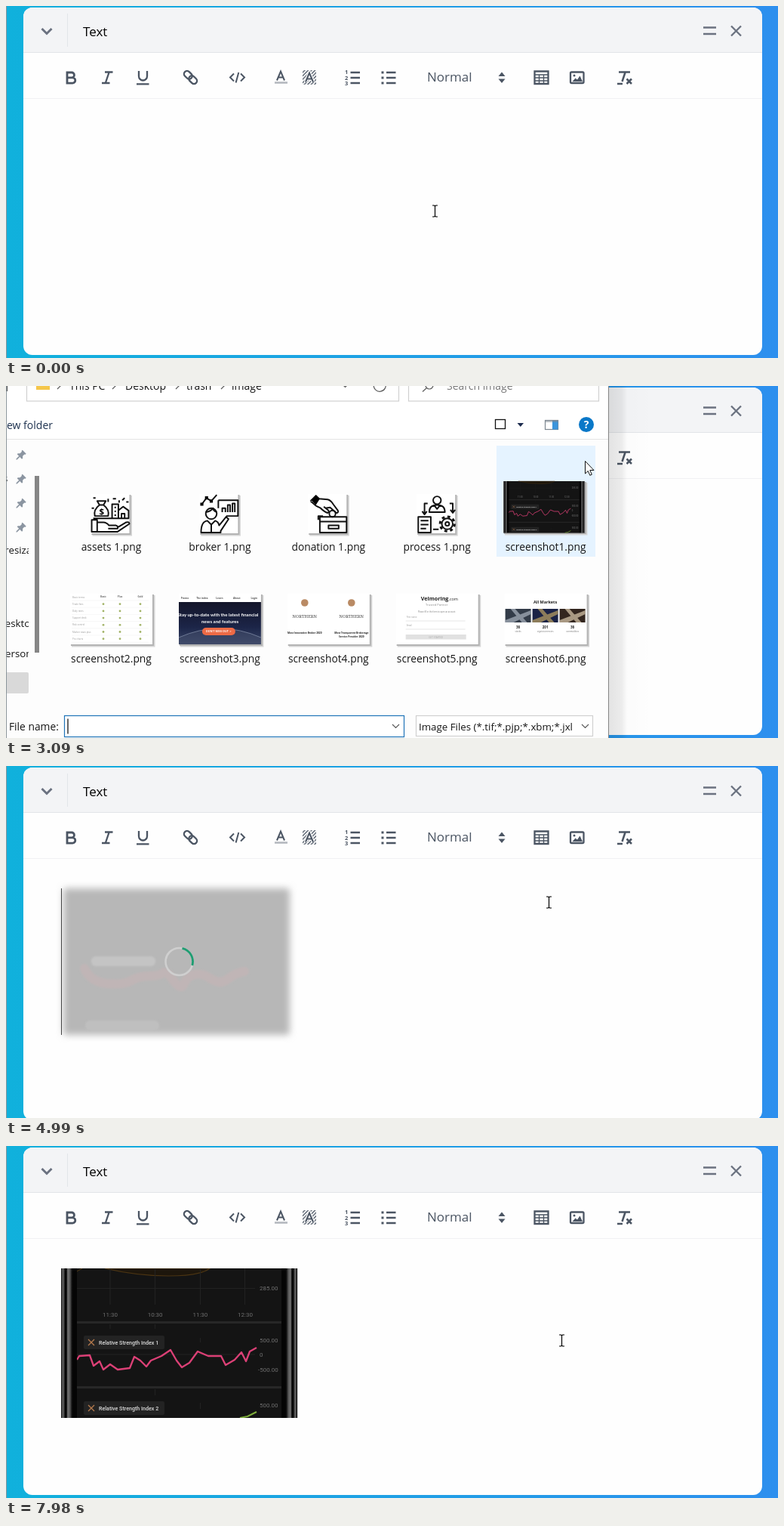
Recreate the animation shown at these times as an HTML page. Size 1023x466 px, loop 8000 ms.

```html
<!DOCTYPE html>
<html lang="en">
<head>
<meta charset="utf-8">
<title>Image upload in a text editor</title>
<style>
html, body { margin: 0; width: 100%; height: 100%; overflow: hidden; background: #1f9fe5; }
svg { display: block; width: 1023px; height: 466px; font-family: "Open Sans", "Noto Sans", sans-serif; }
text { white-space: pre; }
.line { fill: none; stroke: #4b5563; stroke-width: 2.3; }
.ink { fill: #4b5563; }
.head { fill: none; stroke: #6b7280; stroke-width: 2.3; }
.file { font-size: 13.8px; fill: #151515; }
.small { font-size: 13.3px; fill: #151515; }
.thin { fill: none; stroke: #5c5c5c; stroke-width: 1.2; }
.art { fill: none; stroke: #111; stroke-width: 1.9; stroke-linejoin: round; }
.mono { font-family: Roboto, sans-serif; font-size: 8px; fill: #707070; }
.badge { font-family: Roboto, sans-serif; font-size: 7.1px; font-weight: 500; fill: #ddd; }
</style>
</head>
<body>
<svg viewBox="0 0 1023 466" xmlns="http://www.w3.org/2000/svg">
<defs>
  <linearGradient id="sky"><stop stop-color="#10b1dc"/><stop offset="1" stop-color="#2d8fee"/></linearGradient>
  <linearGradient id="shade"><stop stop-color="#000" stop-opacity=".11"/><stop offset=".3" stop-color="#000" stop-opacity=".07"/><stop offset=".42" stop-color="#000" stop-opacity=".01"/><stop offset="1" stop-color="#000" stop-opacity="0"/></linearGradient>
  <linearGradient id="metal">
    <stop stop-color="#000"/><stop offset=".08" stop-color="#5c5c5c"/><stop offset=".18" stop-color="#505050"/>
    <stop offset=".24" stop-color="#060606"/><stop offset=".34" stop-color="#060606"/><stop offset=".42" stop-color="#757575"/>
    <stop offset=".56" stop-color="#585858"/><stop offset=".68" stop-color="#111"/><stop offset=".75" stop-color="#050505"/>
  </linearGradient>
  <linearGradient id="space" x2="0" y2="1"><stop stop-color="#14162a"/><stop offset=".6" stop-color="#1c2548"/><stop offset="1" stop-color="#3a4668"/></linearGradient>
  <pattern id="hatch" width="3.2" height="3.2" patternUnits="userSpaceOnUse" patternTransform="rotate(45)"><path d="M1 0V3.2" stroke="#4b5563" stroke-width="1.3"/></pattern>
  <filter id="soft" x="-10%" y="-15%" width="120%" height="130%"><feGaussianBlur stdDeviation="5"/></filter>
  <filter id="smudge" x="-10%" y="-60%" width="120%" height="220%"><feGaussianBlur stdDeviation="1"/></filter>
  <clipPath id="side"><path d="M-40 60H30V430H-40z"/></clipPath>
  <clipPath id="kinds"><path d="M545 430H754V470H545z"/></clipPath>
  <clipPath id="thumb"><path d="M0 0H109V67H0z"/></clipPath>
  <clipPath id="loaded"><rect id="reveal" width="313" height="198"/></clipPath>
</defs>

<rect width="1023" height="466" fill="url(#sky)"/>
<rect id="panel" x="23" y="2" width="979" height="460" rx="12" fill="#fefefe"/>
<path d="M23 62V14a12 12 0 0 1 12-12H990a12 12 0 0 1 12 12V62z" fill="#f3f4f6"/>
<path d="M23 61.5H1002M81.5 10V54" stroke="#e2e5e9"/>
<path d="M23 122.5H1002" stroke="#f1f1f3"/>
<path d="M47.5 30l6.5 6.5 6.5-6.5" fill="none" stroke="#6b7280" stroke-width="3"/>
<text x="102" y="40" font-size="17" font-weight="500">Text</text>
<path class="head" d="M924 28.5H941M924 37H941M961 26.5l13 13M974 26.5l-13 13"/>

<rect id="hover" x="734" y="72" width="45" height="45" rx="10" fill="#f3f4f6"/>
<g class="line">
  <path stroke-width="2.8" d="M81 88h6a3.4 3.4 0 0 1 0 6.9H81zM81 94.9h7.2a3.6 3.6 0 0 1 0 7.2H81z"/>
  <path d="M131 87.5H141.5M127 102H137.5M136.5 88L131.8 102"/>
  <path d="M176 86v7a5.5 5.5 0 0 0 11 0V86M173 103.3H189.5"/>
  <g transform="translate(244.5 94.5) rotate(45)"><rect x="-10.5" y="-4" width="12" height="8" rx="4"/><rect x="-1.5" y="-4" width="12" height="8" rx="4"/></g>
  <path d="M302 89.5l-5 5 5 5M311 89.5l5 5-5 5M308.3 88L304.6 101.5" stroke-width="2"/>
  <path d="M359 98.5l5-12 5 12M361 94.5h6.5" stroke-width="2"/>
  <path d="M356 101.5H373" stroke="#b4b8bf" stroke-width="2.6"/>
  <path d="M393 85H411V104H393z" fill="url(#hatch)" stroke="none"/>
  <path d="M397 100.5l5-12 5 12M399 96.5h6.5" stroke="#fefefe" stroke-width="4.5"/>
  <path d="M397 100.5l5-12 5 12M399 96.5h6.5" stroke-width="2"/>
  <path d="M456.5 88H469M456.5 95H469M456.5 102H469M504 88H516.5M504 95H516.5M504 102H516.5" stroke-width="2.4"/>
  <path d="M497.5 88h3M497.5 95h3M497.5 102h3" stroke-width="3"/>
  <path d="M700.5 91H719M706.5 91V103M712.5 91V103M701 95H719M701 99H719" stroke-width="1.4"/>
  <path d="M700.5 86.5H718.5V103H700.5z"/>
  <rect x="748" y="87.5" width="17.5" height="14.5" rx="1.5"/>
  <path d="M812 87.5H827M820.5 88L816.5 100M810 103H817M822.5 96.5l6.5 6.5M829 96.5l-6.5 6.5" stroke-width="2.5"/>
</g>
<g class="ink">
  <path d="M750.5 100l4-4.5 2.5 2 3.5-5 3.5 7.5zM652.5 93l4.5-5.5 4.5 5.5zM652.5 96.5l4.5 5.5 4.5-5.5z"/>
  <circle cx="753" cy="92" r="1.5"/>
  <g font-size="7.5" font-weight="700"><text x="449" y="90">1</text><text x="449" y="97.5">2</text><text x="449" y="105">3</text></g>
  <text x="558" y="100" font-size="17">Normal</text>
</g>

<g id="busy">
  <rect x="76" y="162" width="300" height="194" rx="4" fill="#b7b7b7" filter="url(#soft)"/>
  <g filter="url(#smudge)">
    <path d="M104 268q8 18 30 20t32-4 24-6 18-4 14 10 14 4 14-12 22 6 22 0 22-10" fill="none" stroke="#c0b5b6" stroke-width="12" stroke-linejoin="round" stroke-linecap="round"/>
    <rect x="113" y="252" width="85" height="13" rx="6" fill="#c4c4c4"/>
    <rect x="105" y="337" width="98" height="13" rx="6" fill="#bfbfbf"/>
  </g>
  <circle cx="229.5" cy="259" r="18" fill="none" stroke="#cfcfcf" stroke-width="2.6"/>
  <path id="arc" d="M233.5 241.4A18 18 0 0 1 246.8 264" fill="none" stroke="#1f9d72" stroke-width="2.8"/>
  <path d="M73.5 162V356" stroke="#444"/>
</g>
<g id="photo" transform="translate(73 162)"><g id="chart" clip-path="url(#loaded)"></g></g>
<path id="caret" d="M385.5 162V360" stroke="#000" stroke-width="1.2"/>

<g id="dialog"></g>
<g id="tip">
  <rect x="734" y="178" width="160" height="65" fill="#000" opacity=".22"/>
  <rect x="731.5" y="175.5" width="160" height="65" rx="2" fill="#fdfdfd" stroke="#b5b5b5"/>
  <g font-size="13.8" fill="#575757"><text x="737" y="193">Item type: PNG File</text><text x="737" y="213">Dimensions: 250 x 158</text><text x="737" y="233">Size: 19.8 KB</text></g>
</g>
<path d="M.5 0V466" stroke="#8d979c"/>
<path id="beam" d="M-3.5-7.5h2.5l1 1 1-1h2.5M0-6.5V6.5M-3.5 7.5h2.5l1-1 1 1h2.5" fill="none" stroke="#000" stroke-width="1.2"/>
<path id="arrow" d="M0 0V16.5L3.8 13 6.3 18.8 8.8 17.7 6.3 12H11.5z" fill="#fff" stroke="#111"/>
<path id="hand" d="M-2 14.5L-6.8 9.8q-1.2-2 .6-2.5 1-.2 2 .8L-1.7 10.2V1q0-1.6 1.6-1.6T1.5 1V7q.4-1.2 1.7-1 1.5.2 1.5 1.4.5-.8 1.6-.6 1.4.2 1.4 1.6.4-.5 1.2-.4 1.4.2 1.4 1.8V15q0 2-1.5 4V22H-.5V19z" fill="#fff" stroke="#111" stroke-width="1.2" stroke-linejoin="round"/>
</svg>

<script>
const $ = id => document.getElementById(id);
const text = (x, y, s, attr = '') => `<text x="${x}" y="${y}" ${attr}>${s}</text>`;
const path = (d, attr = '') => `<path d="${d}" ${attr}/>`;
const rect = (x, y, w, h, fill, attr = '') => `<rect x="${x}" y="${y}" width="${w}" height="${h}" fill="${fill}" ${attr}/>`;
const dot = (x, y, r, attr) => `<circle cx="${x}" cy="${y}" r="${r}" ${attr}/>`;
const at = (x, y, s, extra = '') => `<g transform="translate(${x} ${y}) ${extra}">${s}</g>`;
const rows = (n, f) => Array.from({ length: n }, (_, i) => f(i)).join('');

// Trading chart, 313 x 198
const wave = 'M21 121l3-5 14-1 5 14 8-6 5 11 9-7 10 7 16-2 6-15 8 5 8 8 6-8 14-6 12-8 8 14 7 9 10-6 11-15 14 6h17l6 12 12-7 9-10 6 12 5-13 9-5';
const mono = (x, y, s, cls = 'mono') => text(x, y, s, `class="${cls}"`);
const badge = (y, n) => rect(30, y, 107, 18, '#232323', 'rx="2"') +
  path(`M36 ${y + 5}l8 8M44 ${y + 5}l-8 8`, 'stroke="#b5794c" stroke-width="1.3"') +
  mono(50, y + 11.6, 'Relative Strength Index ' + n, 'badge');
const edge = rect(0, 0, 21, 198, 'url(#metal)');
const chartArt = rect(0, 0, 313, 198, '#050505') + rect(21, 0, 272, 198, '#141414') +
  path('M58 0Q100 10 142 10T197 0z', 'fill="#1d160c" stroke="#4b3412" stroke-width="1.2"') +
  path('M21 4l7-4', 'stroke="#4b3412"') +
  path('M65 0V48M124.5 0V48M184.5 0V48M243.5 0V48M21 26.5H257M65 74V80M124.5 74V80M184.5 92V98M21 114H257M124.5 160V168M184.5 178V186', 'stroke="#222" fill="none"') +
  rect(21, 70, 272, 3, '#272727') + rect(21, 156, 272, 3, '#272727') +
  mono(263, 29, '285.00') + mono(263, 97.5, '500.00') + mono(263, 117, '0') + mono(261, 136.5, '-500.00') + mono(263, 183.5, '500.00') +
  ['11:30', '10:30', '11:30', '12:30'].map((s, i) => mono(55 + i * 59.7, 64, s)).join('') +
  path(wave, 'fill="none" stroke="#dc4076" stroke-width="2.3" stroke-linejoin="round"') +
  path('M237 198l10-2 12-6', 'fill="none" stroke="#7fae3c" stroke-width="2"') +
  badge(89, 1) + badge(176, 2) + edge + at(313, 0, edge, 'scale(-1 1)');
$('chart').innerHTML = chartArt;

// File thumbnails
const page = (w, h) => rect(2, 2, w + 1.5, h + 1.5, '#d6d6d6') + rect(1, 1, w + 1, h + 1, '#b4b4b4') + rect(0, 0, w, h, '#fff');
const icons = [
  path('M1 33h7v15H1zM8 36h8q4 0 7 4h9q3 1 2 4H22M35 42l10-6q4-1 4 2L34 48H8M8 9h11l-3 5q8 6 6 14H5q-2-8 6-14zM27 30V13h8v17M35 21l6-5 7 5v10H35zM39 31v-6h4v6M28 6h4M40 8l3-3M45 10h3M3 5h3M22 6v4M36 8v3M1 18h3M11 14h5M3 31h45M30 17h2M30 22h2M30 27h2', 'class="art"') + text(10.5, 26, '$', 'font-size="11" font-weight="700"'),
  dot(15, 25, 7, 'class="art"') + path('M8 23q7-1 9-5 1 4 5 5M2 49q0-14 8-15l5 5 5-5q4 1 5 6l9-11 3 3-10 15v2zM15 39v9M24 8h25v20H34M24 8v10M29 23v-5h4v5M36 23v-9h3v9M42 23V12h3v11M3 13l6-8 6 4 7-8', 'class="art"') + path('M1 11h4v4H1zM7 3h4v4H7zM13 7h4v4h-4z'),
  path('M3 9L10 2l4 4 11 1q4 1 7 6l6 8q1 3-2 3l-8-7-6 1M10 15l-7-6M10 15l6 3q5 5 9 6 2-1 1-3l-6-5M15 29h34v20H15zM13 33V28h6M15 35h34M26 40h13v4H26z', 'class="art"') + path('M4 8l6-6 5 4-5 8z') + dot(31, 25, 4, 'class="art"'),
  dot(26, 8, 5, 'class="art"') + path('M16 23q0-9 10-9t10 9zM22 14l4 5 4-5M2 29h16v20H2zM5 34h10M5 39h10M5 44h7M10 25V12h4M42 12h4v11M43 20l3 4 3-4M21 45h7M7 22l3 4 3-4', 'class="art"') + dot(39, 38, 7, 'class="art"') + dot(39, 38, 2.5, 'class="art"') + dot(39, 38, 9.2, 'fill="none" stroke="#111" stroke-width="3" stroke-dasharray="3.6 3.6"')
];
const mid = (x, y, size, s, fill = '#222', weight = 700) =>
  text(x, y, s, `text-anchor="middle" font-size="${size}" fill="${fill}" font-weight="${weight}"`);
const terms = ['Basic terms', 'Trade fees', 'Daily rates', 'Support desk', 'Risk control', 'Market news plus', 'Pro charts'];
const columns = [[44, 'Basic'], [66, 'Plus'], [93, 'Gold']];
const table = rows(7, i => {
  const y = 4.5 + i * 9.2;
  const cells = columns.map(([x, s]) => i ? dot(x, y, 1.4, 'fill="#a3b469"') : mid(x, y, 3, s, '#666')).join('');
  return text(3, y + 1, terms[i], 'font-size="3" fill="#999"') + cells + path(`M2 ${y + 4.5}H104`, 'stroke="#eee" stroke-width=".5"');
});
const hero = rect(0, 11, 109, 56, 'url(#space)') +
  path('M0 58Q54 34 109 58V67H0z', 'fill="#46506d" opacity=".5"') + path('M0 58Q54 34 109 58', 'fill="none" stroke="#8792ad" stroke-width=".7"') +
  ['Promo', 'The index', 'Learn', 'About', 'Login'].map((s, i) => mid(8 + i * 23, 6.5, 3.2, s, '#555')).join('') +
  `<g fill="#fff" font-size="6.1" font-weight="700" style="font-family:Lato,sans-serif">${text(-1.5, 30, 'Stay up-to-date with the latest financial')}${text(30, 38.5, 'news and features')}</g>` +
  rect(31, 45, 44, 10, '#ed6a45', 'rx="5"') + mid(53, 51.3, 3.6, "DON'T MISS OUT  >", '#fff');
const award = (x, a, b) => dot(x, 12, 4.8, 'fill="#b98a64"') +
  text(x, 32, 'NORTHERN', 'text-anchor="middle" font-size="5.8" fill="#444" style="font-family:Noto Serif,serif"') + mid(x, 53, 3.2, a) + mid(x, 57.5, 3.2, b);
const awards = award(23, 'Most Innovative Broker 2020', '') + award(85, 'Most Transparent Brokerage', 'Service Provider 2020');
const form = text(33, 9, 'Velmoring<tspan font-size="5.5" font-weight="400">.com</tspan>', 'font-size="7.2" font-weight="700" fill="#222"') +
  mid(54, 16, 4, 'Trusted Partner', '#888', 400) + mid(54, 25, 2.6, 'Please fill in the form to open an account', '#777', 400) +
  text(14, 32, 'First name', 'font-size="2.8" fill="#999"') + text(14, 43, 'Email', 'font-size="2.8" fill="#999"') +
  path('M13 36H92M13 47H92', 'stroke="#ddd" stroke-width=".7"') + rect(13, 54, 80, 6.5, '#e1e1e1') + mid(53, 58.7, 3, 'GET STARTED', '#aaa', 400);
const photos = [['#333c49', '#a3adb8', '36', 'stocks'], ['#1b2346', '#b39b62', '201', 'cryptocurrencies'], ['#33261f', '#d0bfa4', '36', 'commodities']];
const markets = mid(54, 13, 5.5, 'All Markets') +
  photos.map(([back, tone, count, kind], i) => at(i * 36, 0, rect(1, 20, 34, 18, back) +
    path('M1 35l34-13v5L12 38H1zM8 20h6l16 18h-7z', `fill="${tone}" opacity=".75"`) +
    mid(18, 46, 4.6, count) + mid(18, 50.5, 2.8, kind, '#777', 400))).join('');
const shots = [table, hero, awards, form, markets];

// File dialog
const col = i => 139.5 + i * 143.9;
const label = (i, y, s) => text(col(i), y, s, 'class="file" text-anchor="middle"');
const names = ['assets', 'broker', 'donation', 'process'];
const pin = y => at(20, y, path('M-1-5h5.5v1.5l-1 .8V.5l2 2V4h-9V2.5l2-2v-3.2l-1-.8V-5zM0 4h1.5v5L.7 10 0 9z', 'fill="#8b95a1"'), 'rotate(45)');
const crumb = (x, s) => text(x, 4.5, s, 'font-size="14" fill="#151515"');
const small = (x, y, s) => text(x, y, s, 'class="small"');
const box = (x, y, w, h, stroke = '#d0d0d0') => rect(x, y, w, h, '#fff', `stroke="${stroke}" stroke-width="1.2"`);

$('dialog').innerHTML =
  rect(798, -60, 60, 560, 'url(#shade)') + rect(-60, -60, 858, 560, '#fff') + path('M798.5-60V500', 'stroke="#858585"') +
  rect(-40, 71, 838, 430, '#fdfdfd') + path('M-40 70.5H798', 'stroke="#e4e4e4"') +
  box(27.5, -30, 493, 50) + box(533.5, -30, 252, 50) +
  path('M1.5 7V-9M-4-3l5.5-6 5.5 6M445-3l4.5 4.5 4.5-4.5M502.5-4a8 8 0 1 1-4-4M503-10v6h-6', 'class="thin"') +
  path('M68-4l4 4-4 4M141-4l4 4-4 4M225-4l4 4-4 4M285-4l4 4-4 4', 'class="thin"') +
  path('M40-9h7l2 2h9V5H40z', 'fill="#f5c64a"') +
  dot(561, -1, 5, 'class="thin"') + path('M557.5 2.5l-5.5 5', 'class="thin"') +
  crumb(84, 'This PC') + crumb(158, 'Desktop') + crumb(239, 'trash') + crumb(299, 'image') + text(584, 4.5, 'Search image', 'font-size="14" fill="#777"') +
  text(62, 57, 'New folder', 'text-anchor="end" font-size="14" fill="#1f3350"') +
  rect(648.5, 44.5, 13, 12, '#fff', 'stroke="#111" stroke-width="1.3"') + path('M677.5 49h8.5l-4.2 5z', 'fill="#1d2c4e"') +
  box(714.5, 45.5, 17, 12, '#7d8790') + rect(724, 46, 7.5, 11.5, '#3b95dc') + path('M714 47H732', 'stroke="#7d8790"') +
  dot(769, 51, 10, 'fill="#0a78c8"') + mid(769, 56, 14, '?', '#fff') +
  [90, 122, 154, 186].map(pin).join('') +
  `<g clip-path="url(#side)">${small(-4, 127, 's')}${small(-6, 222, '-resizable')}${small(-11, 319, 'Desktop')}${small(-9, 359, 'Personal')}${rect(-20, 379, 50, 28, '#d9d9d9', 'rx="2"')}</g>` +
  rect(38, 119, 6, 234, '#868686') +
  `<rect id="pick" x="650" y="79" width="131" height="147" fill="#e5f3ff"/>` +
  icons.map((s, i) => at(col(i) - 27, 143, page(51, 52) + `<g transform="scale(1.04)">${s}</g>`) + label(i, 218, names[i] + ' 1.png')).join('') +
  at(659, 126, page(108, 68) + `<g transform="scale(.345)">${chartArt}</g>`) + label(4, 218, 'screenshot1.png') +
  shots.map((s, i) => at(col(i) - 54.5, 275, page(109, 67) + `<g clip-path="url(#thumb)">${s}</g>`) + label(i, 366, `screenshot${i + 2}.png`)).join('') +
  text(4, 456, 'File name:', 'class="file"') +
  box(77.5, 436.5, 450, 28, '#1f74b8') + box(543.5, 436.5, 234, 27) + path('M512 448l4.5 4.5 4.5-4.5M763 448l4.5 4.5 4.5-4.5', 'class="thin"') +
  `<g id="chosen">${text(83, 456, 'screenshot1.png', 'class="file"')}</g><path id="field" d="M82 440.5V460.5" stroke="#000" stroke-width="1.2"/>` +
  `<g clip-path="url(#kinds)">${small(547, 456, 'Image Files (*.tif;*.pjp;*.xbm;*.jxl')}</g>` +
  box(543.5, 474.5, 108, 30) + box(669.5, 474.5, 108, 30);

// Fraction of n even steps done between the first and last step time
const steps = (t, first, last, n) => t < first ? 0 : Math.min(n, Math.floor((t - first) / (last - first) * (n - 1) + .01) + 1) / n;
const ease = u => u * u * (3 - 2 * u);
const mix = (a, b, u) => a + (b - a) * u;
const show = (id, on) => $(id).setAttribute('visibility', on ? 'visible' : 'hidden');
const within = (t, a, b) => t >= a && t < b;

function pointer(t) {
  if (t < 1960) {
    const u = ease(steps(t, 870, 1820, 8));
    return [u < 1 ? 'beam' : 'hand', mix(568, 769, u), mix(271, 106, u)];
  }
  if (t < 2800) return ['hand', 769, 100];
  if (t < 4830) {
    const u = ease(steps(t, 3490, 3930, 4));
    return ['arrow', mix(767, 719, u), mix(99, 175, u)];
  }
  const u = steps(t, 7730, 7980, 3);
  return ['beam', mix(719, 736, u), mix(180, 257, u)];
}

function render(t) {
  const [kind, x, y] = pointer(t);
  for (const id of ['beam', 'arrow', 'hand']) show(id, id === kind);
  $(kind).setAttribute('transform', `translate(${Math.round(x) + .5} ${Math.round(y) + .5})`);
  show('hover', within(t, 1820, 2950));

  const stage = Math.max(1, steps(t, 2650, 3090, 4) * 4);
  const [zoom, alpha] = t >= 4680 ? [.96, .45] : [[.92, .35], [.95, .85], [.9735, 1], [1, 1]][stage - 1];
  show('dialog', within(t, 2650, 4830));
  $('dialog').setAttribute('transform', `translate(252 174) scale(${zoom}) translate(-252 -174)`);
  $('dialog').setAttribute('opacity', alpha);
  $('pick').setAttribute('fill', t >= 4360 ? '#cce8ff' : '#e5f3ff');
  $('chosen').setAttribute('opacity', t >= 4510 ? 1 : 0);
  $('field').setAttribute('opacity', within(t, 2950, 3490) || within(t, 4070, 4510) ? 1 : 0);
  show('tip', within(t, 4070, 4510));
  $('tip').setAttribute('opacity', t < 4210 ? .68 : 1);

  $('panel').setAttribute('height', within(t, 4830, 5680) ? 467 : 460);
  show('busy', within(t, 4990, 5680));
  const turn = steps(t, 5140, 5560, 4) * 4 * 51;
  $('arc').setAttribute('transform', `rotate(${turn} 229.5 259)`);

  show('photo', t >= 6330);
  $('reveal').setAttribute('height', t < 6480 ? 110 : 198);
  show('caret', within(t, 6750, 7310) || t >= 7870);
}

function tick() {
  render(performance.now() % 8000);
  requestAnimationFrame(tick);
}
tick();
</script>
</body>
</html>
```
